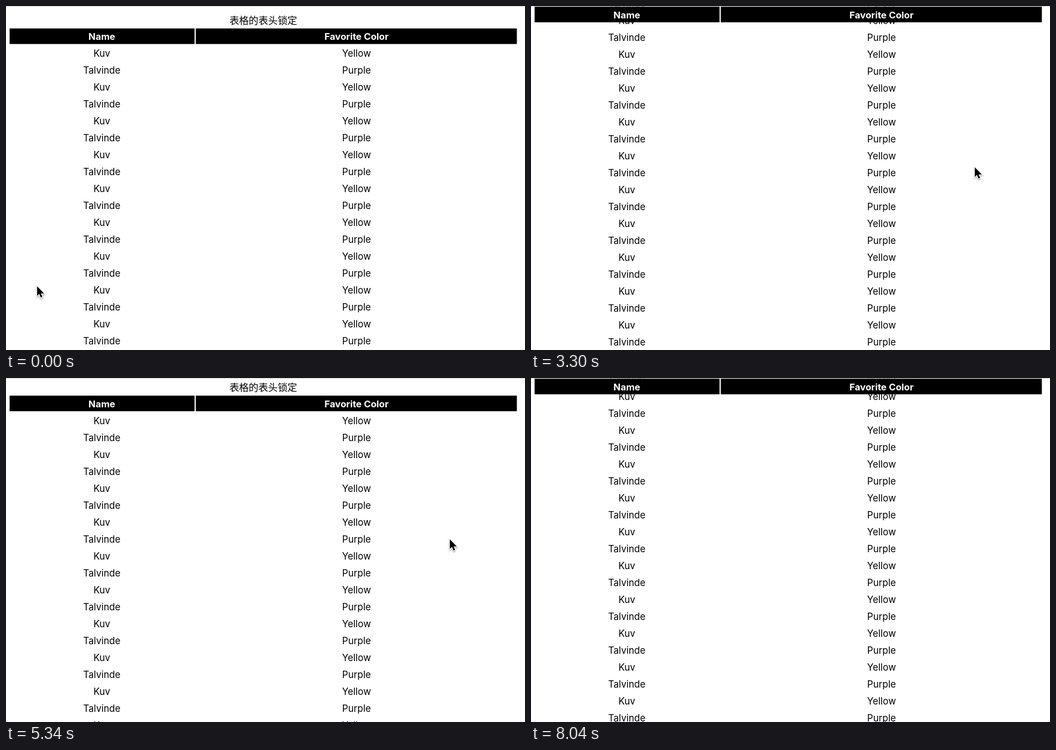
An HTML page with a canvas for the animation above (8.16 s loop, 918 by 610 pixels).

```html
<!DOCTYPE html>
<html lang="zh-CN">
<head>
<meta charset="utf-8">
<title>表格的表头锁定</title>
<style>
  html, body { margin: 0; width: 100%; height: 100%; overflow: hidden; background: #fff; }
  canvas { display: block; }
</style>
</head>
<body>
<canvas id="stage" width="918" height="610"></canvas>
<script>
const ctx = document.getElementById('stage').getContext('2d');
const LOOP = 8160, STEP = 60;
const ROWS = 26, PITCH = 30, FIRST_BASELINE = 90;
const MAX_SCROLL = 250, HEADER_TOP = 39.8, HEADER_HEIGHT = 27.6, STICKY_TOP = 1.3;
const COLUMNS = [
  { title: 'Name', left: 6.4, right: 333.5, center: 169.5, cells: ['Kuv', 'Talvinde'] },
  { title: 'Favorite Color', left: 335.7, right: 903.6, center: 620, cells: ['Yellow', 'Purple'] }
];
const BODY_FONT = '16.6px Inter, "Noto Sans", sans-serif';
const HEAD_FONT = '700 16.6px Inter, "Noto Sans", sans-serif';
const CAPTION_FONT = '17.1px "Noto Sans CJK SC", "Noto Sans CJK", sans-serif';

// [time, scroll offset]; going past MAX_SCROLL is the elastic bounce
const SCROLL = [
  [780, 0], [1620, 147], [2340, 261], [2460, 257], [2820, 250], [3000, 250],
  [3960, 174], [4800, 78.5], [5520, 0], [5700, 0], [6180, 41], [7260, 111]
];

// Monotone cubic curve through the points, flat outside them
function curve(points) {
  const chord = i => (points[i + 1][1] - points[i][1]) / (points[i + 1][0] - points[i][0]);
  const last = points.length - 1;
  const slopes = points.map((p, i) => {
    if (i === 0 || i === last) return 0;
    const a = chord(i - 1), b = chord(i);
    return a * b > 0 ? 2 * a * b / (a + b) : 0;
  });
  return t => {
    if (t <= points[0][0]) return points[0][1];
    if (t >= points[last][0]) return points[last][1];
    const i = points.findIndex(p => p[0] > t) - 1;
    const [t0, v0] = points[i], [t1, v1] = points[i + 1];
    const d = t1 - t0, u = (t - t0) / d, w = 1 - u;
    return v0 * w * w * (1 + 2 * u) + v1 * u * u * (3 - 2 * u)
      + d * u * w * (slopes[i] * w - slopes[i + 1] * u);
  };
}

const scrollAt = curve(SCROLL);
const cursorX = curve([[180, 55], [600, 785], [7380, 785], [7980, 925]]);
const cursorY = curve([[180, 497], [600, 286], [7380, 286], [7980, -30]]);

function text(string, x, y, font, color) {
  ctx.font = font;
  ctx.fillStyle = color;
  ctx.fillText(string, x, y);
}

function drawHeader(top) {
  for (const { title, left, right, center } of COLUMNS) {
    ctx.fillStyle = '#000';
    ctx.fillRect(left, top, right - left, HEADER_HEIGHT);
    text(title, center, top + 20.2, HEAD_FONT, '#fff');
  }
}

function drawCursor(x, y) {
  const arrow = new Path2D('M0 0V17L3.8 13.5L6.6 20L9.4 18.8L6.7 12.7H12.5Z');
  ctx.save();
  ctx.translate(x, y);
  ctx.shadowColor = 'rgba(0,0,0,0.4)';
  ctx.shadowBlur = 3;
  ctx.shadowOffsetY = 1.5;
  ctx.strokeStyle = '#fff';
  ctx.lineWidth = 2.4;
  ctx.stroke(arrow);
  ctx.shadowColor = 'transparent';
  ctx.fillStyle = '#000';
  ctx.fill(arrow);
  ctx.restore();
}

function draw(t) {
  const scroll = Math.round(scrollAt(t) * 2) / 2;
  const bounce = Math.max(0, scroll - MAX_SCROLL);
  ctx.fillStyle = '#fff';
  ctx.fillRect(0, 0, 918, 610);
  ctx.textAlign = 'center';
  text('表格的表头锁定', 455, 31.5 - scroll, CAPTION_FONT, '#000');
  for (let row = 0; row < ROWS; row++) {
    const y = FIRST_BASELINE + row * PITCH - scroll;
    for (const { center, cells } of COLUMNS) text(cells[row % 2], center, y, BODY_FONT, '#000');
  }
  drawHeader(Math.max(HEADER_TOP - scroll, STICKY_TOP) - bounce);
  ctx.fillStyle = '#d0d0d0';
  ctx.fillRect(0, 0, 918, 1);
  if (t < 8040) drawCursor(cursorX(t), cursorY(t));
}

const start = performance.now();
function tick() {
  const t = (performance.now() - start) % LOOP;
  draw(Math.floor(t / STEP) * STEP);
  requestAnimationFrame(tick);
}
tick();
</script>
</body>
</html>
```
